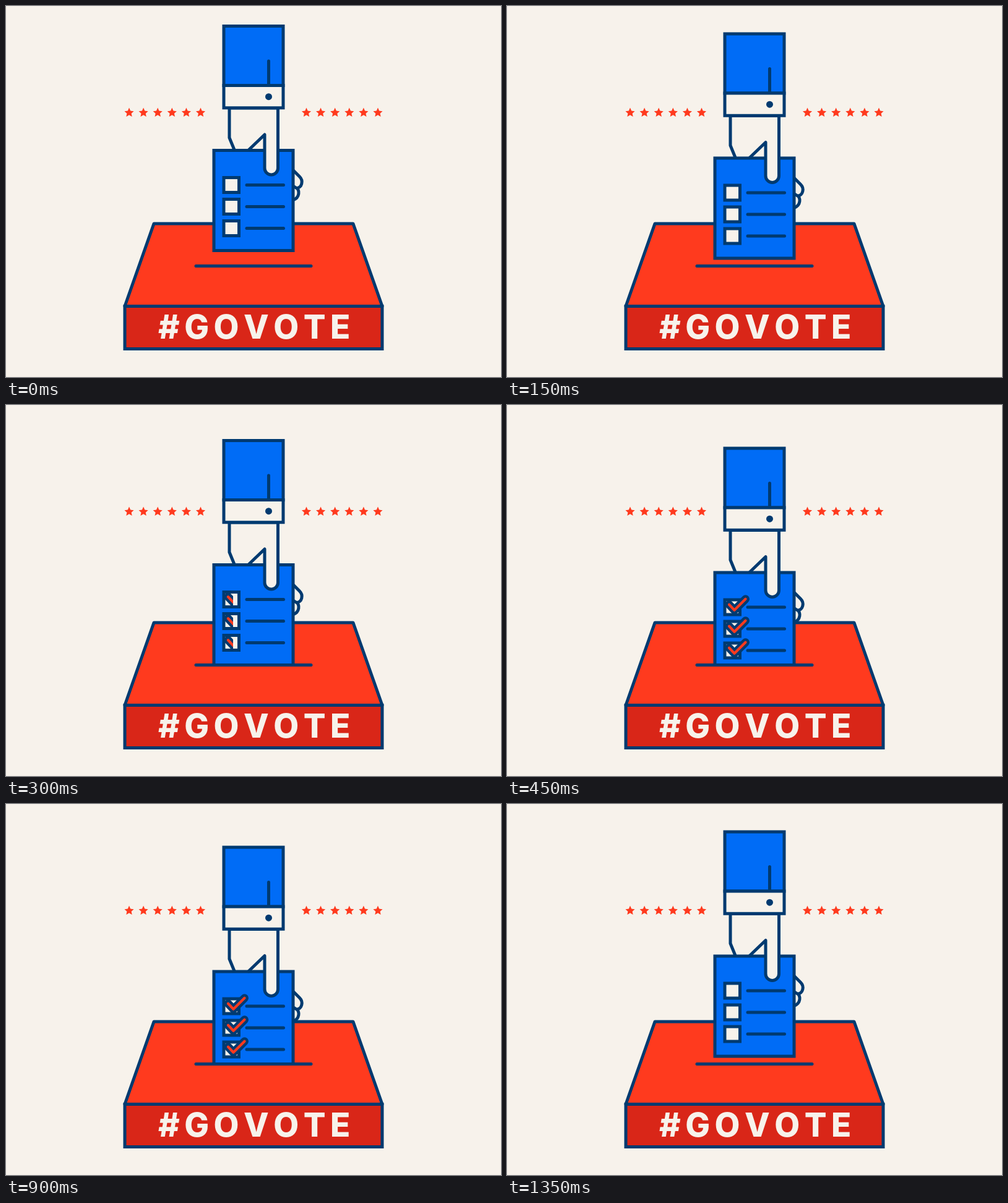
These frames come from a looping animation (800x600 px, 1.5 s). An HTML page with a canvas:

```html
<!DOCTYPE html>
<html lang="en">
<head>
<meta charset="utf-8">
<title>Go vote</title>
<style>
  html, body { margin: 0; width: 100%; height: 100%; overflow: hidden; background: #f7f2eb; }
  canvas { display: block; }
</style>
</head>
<body>
<canvas id="stage" width="800" height="600"></canvas>
<script>
const ctx = document.getElementById('stage').getContext('2d');
const CREAM = '#f7f2eb', NAVY = '#003a70', BLUE = '#006cf6', RED = '#ff3a1e', DARK_RED = '#d92618';
const LOOP = 1500, STEP = 150, DROP = 12.5, SLOT_Y = 420.5;

function paint(path, fill, stroke = NAVY, width = 5) {
  if (fill) {
    ctx.fillStyle = fill;
    ctx.fill(path);
  }
  if (stroke) {
    ctx.strokeStyle = stroke;
    ctx.lineWidth = width;
    ctx.stroke(path);
  }
}

const shape = (d, fill, stroke, width) => paint(new Path2D(d), fill, stroke, width);

function box(x, y, w, h, fill) {
  ctx.lineJoin = 'miter';
  shape(`M${x} ${y}h${w}v${h}h${-w}z`, fill);
  ctx.lineJoin = 'round';
}

function star(cx, cy, r) {
  const path = new Path2D();
  for (let i = 0; i < 10; i++) {
    const a = i * Math.PI / 5, d = i % 2 ? r * 0.47 : r;
    path.lineTo(cx + d * Math.sin(a), cy - d * Math.cos(a));
  }
  path.closePath();
  paint(path, RED, null);
}

function slogan(text, left, right, baseline) {
  ctx.font = '800 53px Inter, "Open Sans", sans-serif';
  ctx.fontKerning = 'none';
  ctx.letterSpacing = '0px';
  const m = ctx.measureText(text);
  const ink = m.actualBoundingBoxLeft + m.actualBoundingBoxRight;
  ctx.letterSpacing = (right - left - ink) / (text.length - 1) + 'px';
  ctx.fillStyle = CREAM;
  ctx.fillText(text, left + m.actualBoundingBoxLeft, baseline);
}

function ballotBox() {
  shape('M239 352H561L608 485.5H192Z', RED);
  box(192, 485.5, 416, 69, DARK_RED);
  slogan('#GOVOTE', 246, 554, 538);
}

// Tick is revealed from the left up to x = edge
function tick(y, edge) {
  const d = `M359 ${y + 7.8}L367.5 ${y + 16.8}L385.5 ${y - 1.2}`;
  ctx.save();
  ctx.beginPath();
  ctx.rect(340, y - 20, edge - 340, 60);
  ctx.clip();
  shape(d, null, NAVY, 13);
  shape(d, null, RED, 4.2);
  ctx.restore();
}

function card(edge) {
  box(336, 233.5, 128, 162, BLUE);
  for (let i = 0; i < 3; i++) {
    const y = 277.5 + i * 35;
    box(352, y, 24.5, 24, CREAM);
    shape(`M389 ${y + 12}H448.5`);
    if (edge) tick(y, edge);
  }
}

function arm(edge) {
  // palm and fingers behind the card
  shape('M361 165V213L370 235H439.5V165Z', CREAM);
  shape('M464 291L469 293.5C475 298 475 310 464 314', CREAM);
  shape('M464 265.5L474.5 276C481 282.5 478.5 294 469.5 294.5L464 291', CREAM);
  card(edge);
  // thumb in front
  shape('M418 208V262.2A10.75 10.75 0 0 0 439.5 262.2V165L428 190Z', CREAM, null);
  shape('M392 233L418 208V262.2A10.75 10.75 0 0 0 439.5 262.2V165');
  // sleeve and cuff
  box(352, 32.5, 96, 96, BLUE);
  shape('M424.5 89V128');
  box(352, 128.5, 96, 36.3, CREAM);
  shape('M419 146.7a5.5 5.5 0 1 0 11 0a5.5 5.5 0 1 0 -11 0', NAVY, null);
}

function draw(time) {
  const beat = Math.floor((time % LOOP) / STEP);
  const pose = Math.min(beat, 3, 10 - beat);
  const edge = [0, 0, 367, 400][pose];

  ctx.fillStyle = CREAM;
  ctx.fillRect(0, 0, 800, 600);
  ctx.lineCap = ctx.lineJoin = 'round';

  for (let i = 0; i < 6; i++) {
    star(199 + i * 23.1, 172.6, 8);
    star(485.5 + i * 23.1, 172.6, 8);
  }
  ballotBox();

  ctx.save();
  ctx.beginPath();
  ctx.rect(0, 0, 800, SLOT_Y);
  ctx.clip();
  ctx.translate(0, pose * DROP);
  arm(edge);
  ctx.restore();

  shape(`M307 ${SLOT_Y}H493`);
}

const start = performance.now();
function frame() {
  draw(performance.now() - start);
  requestAnimationFrame(frame);
}
frame();
</script>
</body>
</html>
```
